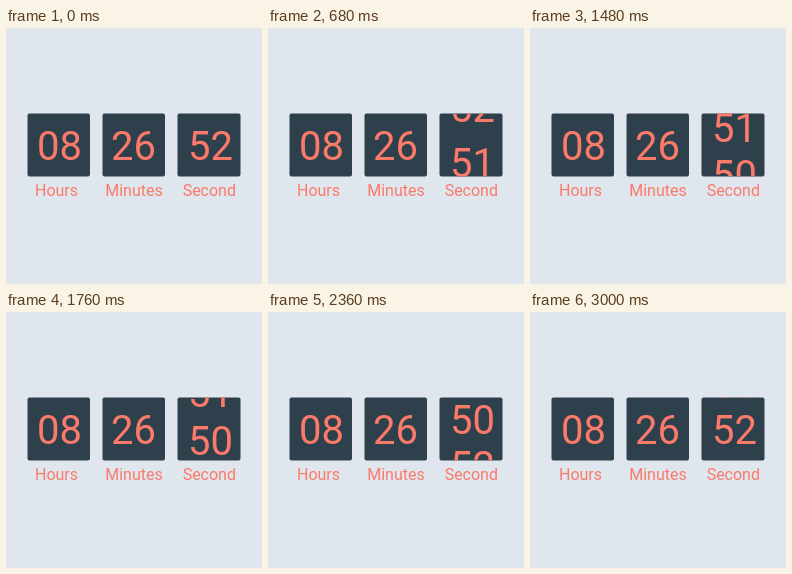
An HTML page for the animation above (3120 ms loop, 256 px wide and 256 px high).

```html
<!DOCTYPE html>
<html lang="en">
<head>
<meta charset="utf-8">
<title>Countdown</title>
<style>
  html, body { margin: 0; width: 100%; height: 100%; overflow: hidden; background: #dfe6ee; }
  svg { display: block; width: 100vw; height: 100vh; }
  text { font-family: Roboto, Arial, sans-serif; fill: #fc7a6a; text-anchor: middle; }
  .digits { font-size: 40px; }
  .label { font-size: 16px; }
  rect { fill: #2f404d; }
</style>
</head>
<body>
<svg viewBox="0 0 256 256">
  <clipPath id="window"><rect x="171.5" y="85.5" width="63" height="63" rx="2"/></clipPath>
  <rect x="21.5" y="85.5" width="62.5" height="63" rx="2"/>
  <rect x="96.5" y="85.5" width="62.5" height="63" rx="2"/>
  <rect x="171.5" y="85.5" width="63" height="63" rx="2"/>
  <g class="digits">
    <text x="53.5" y="132">08</text>
    <text x="127.5" y="132">26</text>
    <g clip-path="url(#window)"><g id="strip"></g></g>
  </g>
  <g class="label">
    <text x="50.5" y="168">Hours</text>
    <text x="128" y="168">Minutes</text>
    <text x="203.3" y="168">Second</text>
  </g>
</svg>
<script>
const LOOP = 3120, STEP = 40;
// Rolls between neighbouring numbers: start, end (ms) and distance (px).
const rolls = [[80, 1000, 55], [1120, 2000, 47.5], [2120, 3000, 46]];
const strip = document.getElementById('strip');

let y = 132;
['52', '51', '50', '52'].forEach((value, i) => {
  strip.insertAdjacentHTML('beforeend', `<text x="204.5" y="${y}">${value}</text>`);
  if (rolls[i]) y += rolls[i][2];
});

// Gentle ease: halfway between linear and sine in-out.
const ease = p => (p + (1 - Math.cos(Math.PI * p)) / 2) / 2;

function draw() {
  const t = Math.floor(performance.now() % LOOP / STEP) * STEP;
  let shift = 0;
  for (const [start, end, distance] of rolls) {
    const p = Math.min(1, Math.max(0, (t - start) / (end - start)));
    shift += distance * ease(p);
  }
  strip.setAttribute('transform', `translate(0 ${-shift})`);
  requestAnimationFrame(draw);
}
draw();
</script>
</body>
</html>
```
